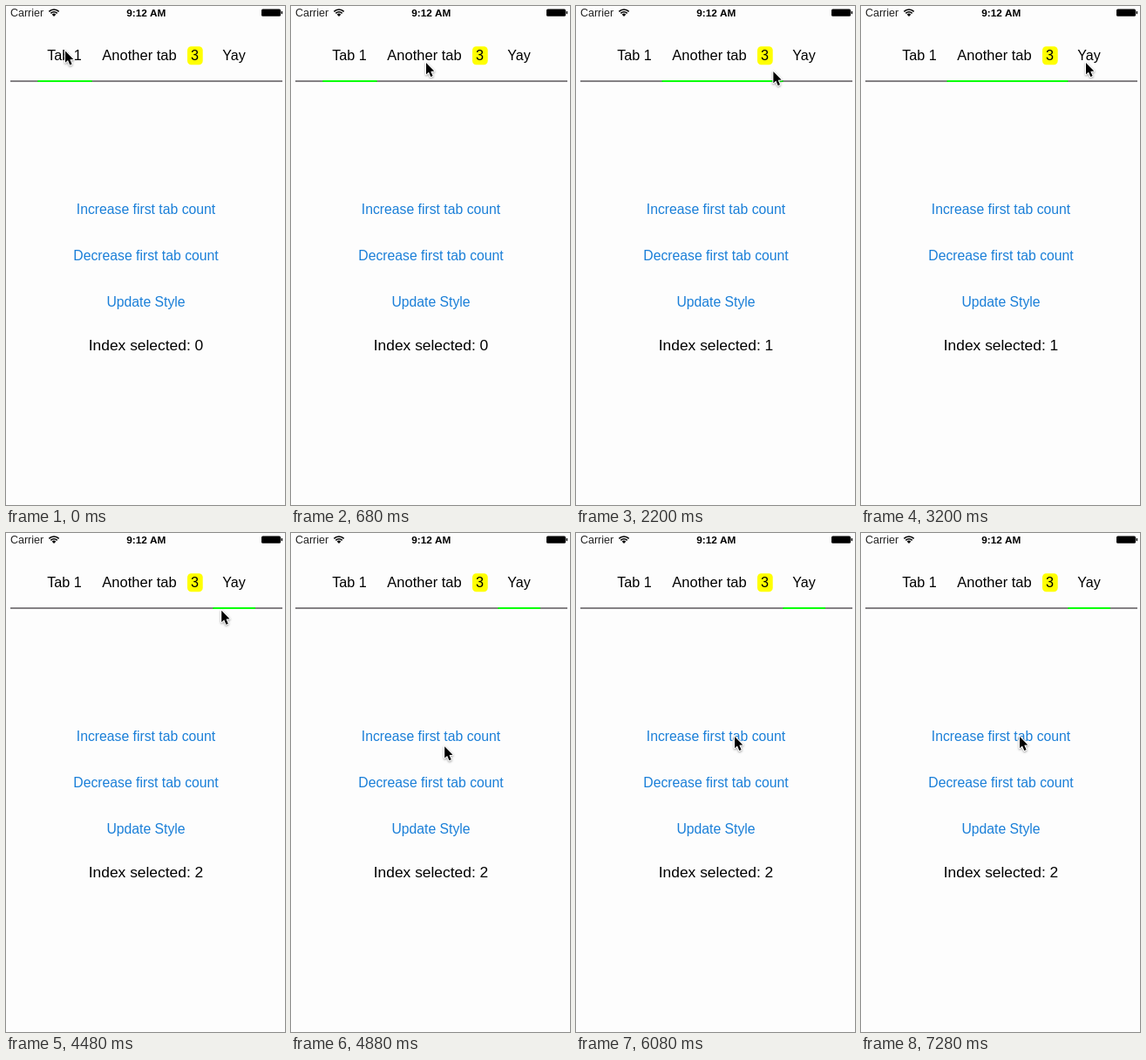
Animation, 320 px wide and 571 px high, one loop 8000 ms. Source, as an HTML page with a canvas:

```html
<!DOCTYPE html>
<html lang="en">
<head>
<meta charset="utf-8">
<title>Tabs</title>
<style>
html, body { margin: 0; width: 100%; height: 100%; overflow: hidden; background: #fdfdfd; }
canvas { display: block; width: 320px; height: 571px; }
</style>
</head>
<body>
<canvas id="stage"></canvas>
<script>
const W = 320, H = 571, LOOP = 8000, STEP = 40;
const canvas = document.getElementById('stage');
const ctx = canvas.getContext('2d');
const dpr = window.devicePixelRatio || 1;
canvas.width = W * dpr;
canvas.height = H * dpr;

const FONT = '"Liberation Sans", Arial, sans-serif';
const BLACK = '#000', BLUE = '#1a7fd8';
const CENTER = 160.5;

const edges = [36.3, 98.6, 237.4, 286];
const taps = [1790, 4220];
const SLIDE = 250;

// The pointer glides to each goal in turn; sag bows the way downwards
const home = { x: 68, y: 51.5 };
const moves = [
  { start: 0, end: 680, x: 155, y: 65 },
  { start: 1120, end: 1240, x: 155, y: 63 },
  { start: 1800, end: 2360, x: 244, y: 67, sag: 15 },
  { start: 3040, end: 3200, x: 258, y: 65 },
  { start: 4330, end: 5040, x: 164, y: 271 },
  { start: 5080, end: 5560, x: 181, y: 235 },
  { start: 5880, end: 6080, x: 182, y: 233 }
];

const mix = (a, b, p) => a + (b - a) * p;

function progress(t, start, end) {
  const p = Math.max(0, Math.min(1, (t - start) / (end - start)));
  return p * p * (3 - 2 * p);
}

function pointerAt(t) {
  let { x, y } = home;
  for (const m of moves) {
    const p = progress(t, m.start, m.end);
    x = mix(x, m.x, p);
    y = mix(y, m.y, p) + (m.sag || 0) * Math.sin(Math.PI * p);
  }
  return [x, y];
}

function text(str, x, y, size, color = BLACK, weight = 'normal') {
  ctx.font = `${weight} ${size}px ${FONT}`;
  ctx.textAlign = 'center';
  ctx.fillStyle = color;
  ctx.fillText(str, x, y);
}

function box(x, y, w, h, r, color) {
  ctx.fillStyle = color;
  ctx.beginPath();
  ctx.roundRect(x, y, w, h, r);
  ctx.fill();
}

function wifi(x, y) {
  const from = -Math.PI * 0.75, to = -Math.PI * 0.25;
  ctx.strokeStyle = ctx.fillStyle = BLACK;
  ctx.lineWidth = 1.6;
  for (const r of [8, 5.2]) {
    ctx.beginPath();
    ctx.arc(x, y, r, from, to);
    ctx.stroke();
  }
  ctx.beginPath();
  ctx.moveTo(x, y);
  ctx.arc(x, y, 3.2, from, to);
  ctx.fill();
}

function statusBar() {
  text('Carrier', 24, 12, 12.5, '#222');
  wifi(55, 12);
  text('9:12 AM', 160.8, 12, 11.8, BLACK, 'bold');
  box(293, 3.4, 22, 8.4, 1.5, BLACK);
  box(315.6, 5.9, 1.5, 3.4, 0.7, BLACK);
}

function tabBar(left, right) {
  text('Tab 1', 67, 62, 16.2);
  text('Another tab', 153, 62, 16.5);
  box(208, 46.3, 17.7, 20.9, 4.5, '#ff0');
  text('3', 216.6, 62, 16.2);
  text('Yay', 261.5, 62, 16);
  box(5, 85.2, 312, 1.6, 0, '#5c585c');
  box(left, 85, right - left, 2, 0, '#0f0');
}

function pointer(x, y) {
  ctx.save();
  ctx.translate(x, y);
  ctx.lineJoin = 'round';
  ctx.lineWidth = 2;
  ctx.strokeStyle = '#fff';
  ctx.fillStyle = BLACK;
  ctx.shadowColor = 'rgba(0,0,0,0.4)';
  ctx.shadowBlur = 2.5 * dpr;
  ctx.shadowOffsetY = dpr;
  const arrow = new Path2D('M0 0V13.2L3 10.6 5.3 16 7.6 15 5.3 9.8 9.3 9.5Z');
  ctx.stroke(arrow);
  ctx.shadowColor = 'transparent';
  ctx.fill(arrow);
  ctx.restore();
}

function draw(t) {
  ctx.setTransform(dpr, 0, 0, dpr, 0, 0);
  box(0, 0, W, H, 0, '#fdfdfd');

  const index = taps.filter(tap => t >= tap).length;
  const slid = taps.reduce((sum, tap) => sum + progress(t, tap, tap + SLIDE), 0);
  const tab = Math.min(Math.floor(slid), taps.length - 1), p = slid - tab;

  statusBar();
  tabBar(mix(edges[tab], edges[tab + 1], p), mix(edges[tab + 1], edges[tab + 2], p));
  ['Increase first tab count', 'Decrease first tab count', 'Update Style']
    .forEach((label, i) => text(label, CENTER, 238 + 53 * i, 15.75, BLUE));
  text('Index selected: ' + index, CENTER, 393.5, 17.4);
  pointer(...pointerAt(t));
}

const start = performance.now();
function tick() {
  const t = (performance.now() - start) % LOOP;
  draw(Math.floor(t / STEP) * STEP);
  requestAnimationFrame(tick);
}
tick();
</script>
</body>
</html>
```
